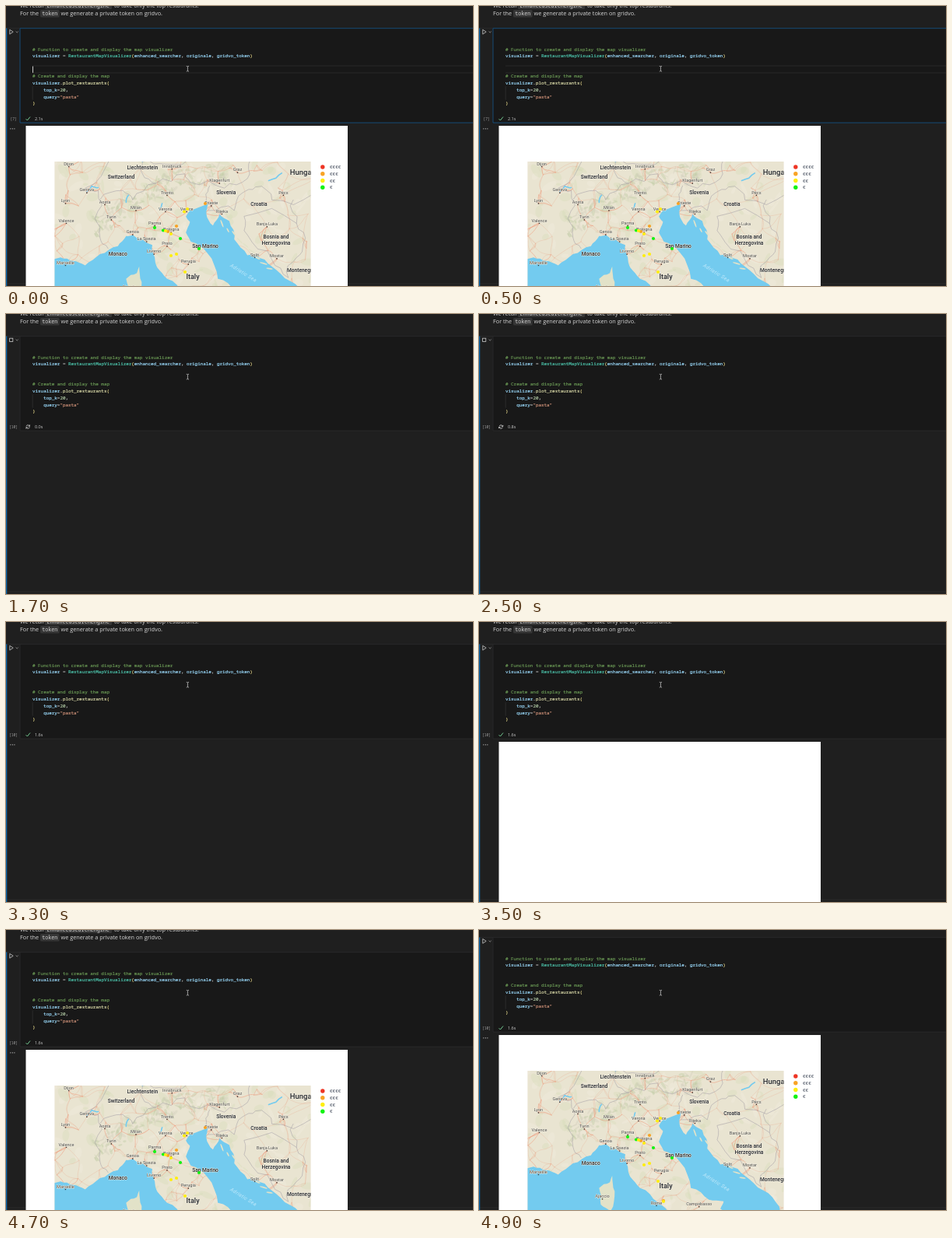
Animation, 600 px wide and 360 px high, one loop 5 s. Source, as an HTML page:

```html
<!DOCTYPE html>
<html lang="en">
<head>
<meta charset="utf-8">
<title>Notebook map</title>
<style>
  html, body { margin: 0; width: 100%; height: 100%; overflow: hidden; background: #1f1f1f; }
  svg { display: block; width: 600px; height: 360px; }
  text { white-space: pre; }
  .prose { font: 7.3px "Open Sans", "Noto Sans", sans-serif; fill: #d6d6d6; }
  .mono { font: 6.7px "Noto Sans Mono", "DejaVu Sans Mono", monospace; fill: #d6d6d6; }
  .code { font: 5.9px "Noto Sans Mono", "DejaVu Sans Mono", monospace; stroke-width: .16px; }
  .small { font: 5.5px "Open Sans", "Noto Sans", sans-serif; fill: #ccc; }
  .count { font: 4.6px "Noto Sans Mono", monospace; fill: #a0a0a0; }
  .legend { font: 6.1px "Open Sans", sans-serif; fill: #3b4454; }
  .city, .land { text-anchor: middle; font-family: Roboto, Inter, sans-serif; paint-order: stroke;
    stroke: #f2eee2; stroke-width: .9px; stroke-linejoin: round; }
  .city { font-size: 5.6px; fill: #4c4c48; }
  .land { font-weight: 500; fill: #24272c; }
  .sea { font: italic 6.6px Roboto, sans-serif; text-anchor: middle; fill: #c3eafb; letter-spacing: .4px; }
</style>
</head>
<body>
<svg viewBox="0 0 600 360" xmlns="http://www.w3.org/2000/svg">
  <rect width="600" height="360" fill="#1f1f1f"/>
  <rect y="356.5" width="600" height="1" fill="#2a2a2b"/>
  <g id="page">
    <rect x="50" y="-5" width="86" height="9" rx="1.5" fill="#363636"/>
    <rect x="44" y="5" width="24.6" height="9.4" rx="1.5" fill="#363636"/>
    <text class="prose" x="18" y="2.2">We recall</text>
    <text class="mono" x="52.5" y="2">EnhancedSearchEngine</text>
    <text class="prose" x="139" y="2.2">to take only the top restaurants.</text>
    <text class="prose" x="18" y="12.2">For the</text>
    <text class="mono" x="46.3" y="12">token</text>
    <text class="prose" x="70.5" y="12.2">we generate a private token on gridvo.</text>

    <rect x="18" y="28.7" width="600" height="121.4" fill="#181818"/>
    <path d="M0 28.7H600M18 28.7V150.1H600" fill="none" stroke="#2d2d2e" stroke-width=".8"/>
    <g id="focus" fill="none">
      <path d="M34 77H600M34 86H600" stroke="#2b2b2b" stroke-width=".8"/>
      <path d="M600 28.7H18V150.1H600" stroke="#0d5084" stroke-width=".8"/>
    </g>
    <rect y="28.5" width="1.3" height="400" fill="#0b66aa"/>
    <path id="play" d="M4.8 30.4L9.2 33.3L4.8 36.2Z" fill="none" stroke="#ccc" stroke-width=".8"/>
    <rect id="stop" x="4.6" y="31.2" width="4.2" height="4.2" fill="none" stroke="#ccc" stroke-width=".8"/>
    <path d="M12.6 32.6L14.2 34.2L15.8 32.6" fill="none" stroke="#aaa" stroke-width=".7"/>
    <path d="M34.2 103.3V120.6" stroke="#404040" stroke-width=".5"/>
    <g id="code" class="code"></g>
    <rect id="caret" x="34" y="77.5" width=".9" height="8.3" fill="#dcdcdc"/>
    <text id="count" class="count" y="146.6"></text>
    <path id="check" d="M25.6 145.2L27.4 147L31 142.5" fill="none" stroke="#73c991" stroke-width="1"/>
    <path id="spin" d="M26 144.4A2.3 2.3 0 0 1 30.3 144.1M30.5 142.4V144.3H28.7M30.4 145.4A2.3 2.3 0 0 1 26.1 145.9M25.9 147.6V145.7H27.7" fill="none" stroke="#ccc" stroke-width=".8"/>
    <text id="timer" class="small" x="37" y="146.9"></text>
    <path id="dots" d="M5.9 157.8h5.2" stroke="#ccc" stroke-width="1.3" stroke-linecap="round" stroke-dasharray="0 2.5"/>
    <g id="output">
      <rect x="25.5" y="154" width="413.5" height="300" fill="#fff"/>
      <g id="chart">
        <clipPath id="frame"><rect x="62.5" y="200" width="329" height="200"/></clipPath>
        <clipPath id="tiles"><rect id="tileRect" y="200" height="200"/></clipPath>
        <g clip-path="url(#frame)">
          <rect x="62.5" y="200" width="329" height="200" fill="#ede6e0"/>
          <g id="map" clip-path="url(#tiles)"></g>
          <g id="labels"></g>
          <g id="points"></g>
        </g>
        <g id="legend"></g>
      </g>
    </g>
  </g>
  <path d="M231.8 77.4H232.8L233.4 78L234 77.4H235M233.4 78V83.4M231.8 84H232.8L233.4 83.4L234 84H235" fill="none" stroke="#d8d8d8" stroke-width=".7"/>
</svg>
<script>
const $ = id => document.getElementById(id);
const LOOP = 5000;
const LAND = '#e9e4d1', SEA = '#73cbef';

// Code cell: one colour per capture group
const token = /(#.*)|(".*?")|(\d+)|([A-Z]\w*)|([a-z]\w*(?=\())|([()])|([a-z]\w*)|(.)/g;
const inks = ['#6a9955', '#ce9178', '#b5cea8', '#4ec9b0', '#dcdcaa', '#e6d98a', '#9cdcfe', '#d4d4d4'];
const source = `# Function to create and display the map visualizer
visualizer = RestaurantMapVisualizer(enhanced_searcher, originale, gridvo_token)


# Create and display the map
visualizer.plot_restaurants(
    top_k=20,
    query="pasta"
)`;
const paint = (part, ...groups) => {
  const ink = inks[groups.findIndex((g, i) => g && i < inks.length)];
  return `<tspan fill="${ink}" stroke="${ink}">${part}</tspan>`;
};
$('code').innerHTML = source.split('\n').map((line, row) =>
  `<text x="34" y="${57.6 + row * 8.7}">${line.replace(token, paint)}</text>`).join('');

// Map: Mercator projection of longitude and latitude
let seed = 11;
const rand = () => (seed = (seed * 16807) % 2147483647) / 2147483647;
const spread = n => (rand() - .5) * n;
const rad = Math.PI / 180, SCALE = 21.05;
const mercator = lat => Math.log(Math.tan(Math.PI / 4 + lat * rad / 2)) / rad;
const geo = ([lon, lat]) => [212 + SCALE * (lon - 11.34), 291.5 - SCALE * (mercator(lat) - mercator(44.49))];
const pairs = s => s.trim().split(/\s+/).map(p => p.split(',').map(Number));

// Key points joined by a line roughened with midpoint displacement
function rough(s, amount = .2) {
  let pts = pairs(s).map(geo);
  for (let level = 0; level < 2; level++) {
    pts = pts.flatMap(([x, y], i) => {
      if (!i) return [[x, y]];
      const [u, v] = pts[i - 1], k = spread(amount);
      return [[(x + u) / 2 + (y - v) * k, (y + v) / 2 - (x - u) * k], [x, y]];
    });
  }
  return 'M' + pts.join('L');
}

const places = s => s.trim().split(/\s+/).map(item => {
  const [name, lon, lat, size] = item.split(',');
  const [x, y] = geo([+lon, +lat]);
  return { name: name.replace('_', ' '), x, y, size: size || 6.6 };
});

const cities = places(`Dijon,5.1,47.3 Innsbruck,11.4,47.2 Graz,15.4,47.05 Klagenfurt,14.3,46.6 Geneva,6.2,46.2
  Trento,11.1,46.1 Lyon,4.9,45.75 Aosta,7.3,45.7 Milan,9.2,45.45 Turin,7.7,45.05 Valence,4.95,44.9 Verona,11,45.4
  Venice,12.3,45.4 Trieste,13.8,45.65 Rijeka,14.45,45.3 Parma,10.35,44.8 Bologna,11.35,44.5 Genoa,9,44.4
  La_Spezia,9.85,44.1 Prato,11.1,43.9 Livorno,10.3,43.55 Perugia,12.4,43.1 Marseille,4.9,43.05 Pécs,18.2,46.1
  Banja_Luka,17.2,44.75 Split,16.45,43.4 Mostar,17.8,43.35 Ajaccio,8.8,41.95 Rome,12.1,41.65 Campobasso,14.7,41.6`);
const countries = places(`Liechtenstein,9.6,47.15 Switzerland,8.3,46.75 Slovenia,14.7,46.1 Croatia,16.7,45.6
  Bosnia_and,17.75,44.2 Herzegovina,17.75,43.93 San_Marino,13.43,43.77 Monaco,8.1,43.43 Montenegro,19.27,42.7
  Italy,12.67,42.43,9 Hungary,19.45,46.95,9.5`);

const coasts = [
  `3,43.3 4.6,43.4 5.35,43.25 6.1,43.05 7,43.55 8.1,43.9 8.6,44.35 9,44.4 10.2,43.95 10.35,43.4 10.5,42.95 11.1,42.45
   12.2,41.8 13.1,41.2 13.6,40 3,40 3,43.3`,
  `12.25,45.2 12.5,45.45 13.6,45.75 13.5,45.3 13.9,44.8 14.3,45.3 14.9,45 15.2,44.2 16,43.5 16.5,43.5 17.5,43 18.6,42.35
   19.6,41.6 19.6,40 16,41.5 16.2,41.85 15.3,41.92 14.2,42.45 13.55,43.6 12.55,44.1 12.25,44.5 12.5,44.95 12.25,45.2`
];
const corsica = '9.4,43 9.55,42.3 9.3,41.4 8.7,41.7 8.6,42.45 9.25,42.7 9.4,43';
const borders = [
  '7.6,47.6 6.1,46.4 6.9,46.3 6.7,45.1 7,44.3 7.5,43.8',
  '7,45.9 8.4,46.3 9,45.9 10.4,46.6 12.2,47 12.5,46.65 14.6,46.4 16,46.8 16.2,47.6',
  '7.6,47.6 9.6,47.5 9.6,47 10.4,46.6', '9.6,47.5 11,47.4 13,47.6', '13.7,46.5 13.5,46 13.8,45.6',
  '13.6,45.45 15.2,45.45 15.7,46.2 16.5,46.45 17.5,45.9 20,46.15',
  '18.8,45.9 19,44.9 15.8,45.2 16,44.4 17.5,43.3 18.5,42.5 19,43.4 19.4,44 19,44.9'
];
const lakes = ['17.3,46.72 18.1,47.03', '6.2,46.25 6.5,46.48 6.9,46.42', '10.8,45.75 10.65,45.5', '9,47.7 9.6,47.52', '8.75,46.1 8.6,45.8'];

const ellipse = (x, y, rx, ry, angle, fill, opacity = 1) =>
  `<ellipse cx="${x}" cy="${y}" rx="${rx}" ry="${ry}" transform="rotate(${angle} ${x} ${y})" fill="${fill}" opacity="${opacity}"/>`;
const line = (d, colour, width, opacity = 1) =>
  `<path d="${d}" fill="none" stroke="${colour}" stroke-width="${width}" stroke-linecap="round" opacity="${opacity}"/>`;

function terrain() {
  let out = '';
  for (let i = 0; i < 200; i++) {
    out += ellipse(62 + rand() * 330, 198 + rand() * 190, 3 + rand() * 8, 1.5 + rand() * 4, rand() * 180,
      rand() < .6 ? '#cfd7b0' : '#f3eee0', .28);
  }
  for (let i = 0; i < 160; i++) {
    const u = rand(), arc = Math.sin(u * Math.PI * .55);
    out += ellipse(112 + u * 170, 285 - arc * 66 + spread(30), 2 + rand() * 4, .6 + rand() * 1.3, rand() * 180,
      rand() < .6 ? '#c3cda8' : '#d6d1be', .45);
  }
  return out;
}

function roads() {
  const nodes = cities.map(c => [c.x, c.y]);
  for (let i = 0; i < 170; i++) nodes.push([58 + rand() * 338, 196 + rand() * 190]);
  let major = '', minor = '';
  nodes.forEach(([x, y], i) => {
    const near = nodes.map(([u, v]) => [Math.hypot(u - x, v - y), u, v]).sort((a, b) => a[0] - b[0]);
    for (const [len, u, v] of near.slice(1, 4)) {
      const at = k => `${x + (u - x) * k + spread(len * .5)} ${y + (v - y) * k + spread(len * .5)}`;
      const d = `M${x} ${y}C${at(.33)} ${at(.67)} ${u} ${v}`;
      if (i < cities.length) major += d; else minor += d;
    }
  });
  return line(minor, '#e8b095', .45, .75) + line(major, '#ee9c7c', .65, .85);
}

function islands() {
  let out = '';
  for (let i = 0; i < 9; i++) {
    const u = i / 8, [x, y] = geo([14.45 + u * 2.9, 44.9 - u * 2 + spread(.15)]);
    out += ellipse(x, y, 3 + rand() * 3, .9, 70 - u * 62, '#e2e2c8');
  }
  return out;
}

$('map').innerHTML = `<rect x="62" y="200" width="330" height="200" fill="${LAND}"/>` + terrain() + roads() +
  borders.map(b => line(rough(b, .5), '#9d98a2', .55, .9)).join('') +
  coasts.map(c => `<path d="${rough(c)}Z" fill="${SEA}"/>`).join('') +
  `<path d="${rough(corsica)}Z" fill="#e2e2c8"/>` + islands() +
  lakes.map(l => line(rough(l), SEA, 1.6)).join('');

const mark = p => `<rect x="${p.x - .7}" y="${p.y - .7}" width="1.4" height="1.4" fill="#333"/>`;
$('labels').innerHTML =
  cities.map(c => mark(c) + `<text class="city" x="${c.x}" y="${c.y - 1.8}">${c.name}</text>`).join('') +
  countries.map(c => `<text class="land" x="${c.x}" y="${c.y - 3.5 + c.size * .35}" font-size="${c.size}">${c.name}</text>`).join('') +
  '<text class="sea" transform="translate(304 345) rotate(32)">Adriatic Sea</text>';

const tone = { red: '#ee3524', orange: '#f8a325', yellow: '#ffee10', green: '#12f312' };
const spots = {
  orange: '219,283 256,254 208,290 237,367',
  green: '191,285 202,288.5 224,299 248,312',
  yellow: '233,261 229,264.5 205,289 212,293 212,321 219,319 230,342 237,368'
};
const dot = (x, y, r, fill) => `<circle cx="${x}" cy="${y}" r="${r}" fill="${fill}"/>`;
$('points').innerHTML = Object.entries(spots).map(([k, s]) =>
  pairs(s).map(([x, y]) => dot(x, y, 2.1, tone[k])).join('')).join('');
$('legend').innerHTML = Object.values(tone).map((fill, i) =>
  dot(406.8, 207 + i * 8.75, 2.7, fill) +
  `<text class="legend" x="416" y="${209.2 + i * 8.75}">${'€'.repeat(4 - i)}</text>`).join('');

// Timeline
const show = (id, on) => $(id).style.display = on ? '' : 'none';
const clamp = v => Math.max(0, Math.min(1, v));

function draw(t) {
  const before = t < 1600, running = !before && t < 3200;
  show('focus', t < 1500);
  show('caret', t < 1500 && t % 1000 < 500);
  show('play', !running);
  show('stop', running);
  show('check', !running);
  show('spin', running);
  show('dots', before || t >= 3300);
  show('output', before || t >= 3500);
  show('chart', before || t >= 3700);
  show('map', before || t >= 4000);
  show('points', before || t >= 4300);

  const left = before || t >= 4200 ? 62 : 211;
  $('tileRect').setAttribute('x', left);
  $('tileRect').setAttribute('width', 392 - left);
  $('labels').style.opacity = before ? 1 : clamp((t - 4200) / 300);

  $('count').textContent = before ? '[7]' : '[10]';
  $('count').setAttribute('x', before ? 5.5 : 4);
  const secs = running ? Math.max(0, Math.floor((t - 1650) / 100) / 10) : before ? 2.1 : 1.6;
  $('timer').textContent = secs.toFixed(1) + 's';
  $('spin').setAttribute('transform', `rotate(${running ? (t - 1700) * .24 : 0} 28.2 145)`);
  $('page').setAttribute('transform', `translate(0 ${t >= 4800 ? -19 : 0})`);
}

const start = performance.now();
function tick() {
  draw((performance.now() - start) % LOOP);
  requestAnimationFrame(tick);
}
tick();
</script>
</body>
</html>
```
